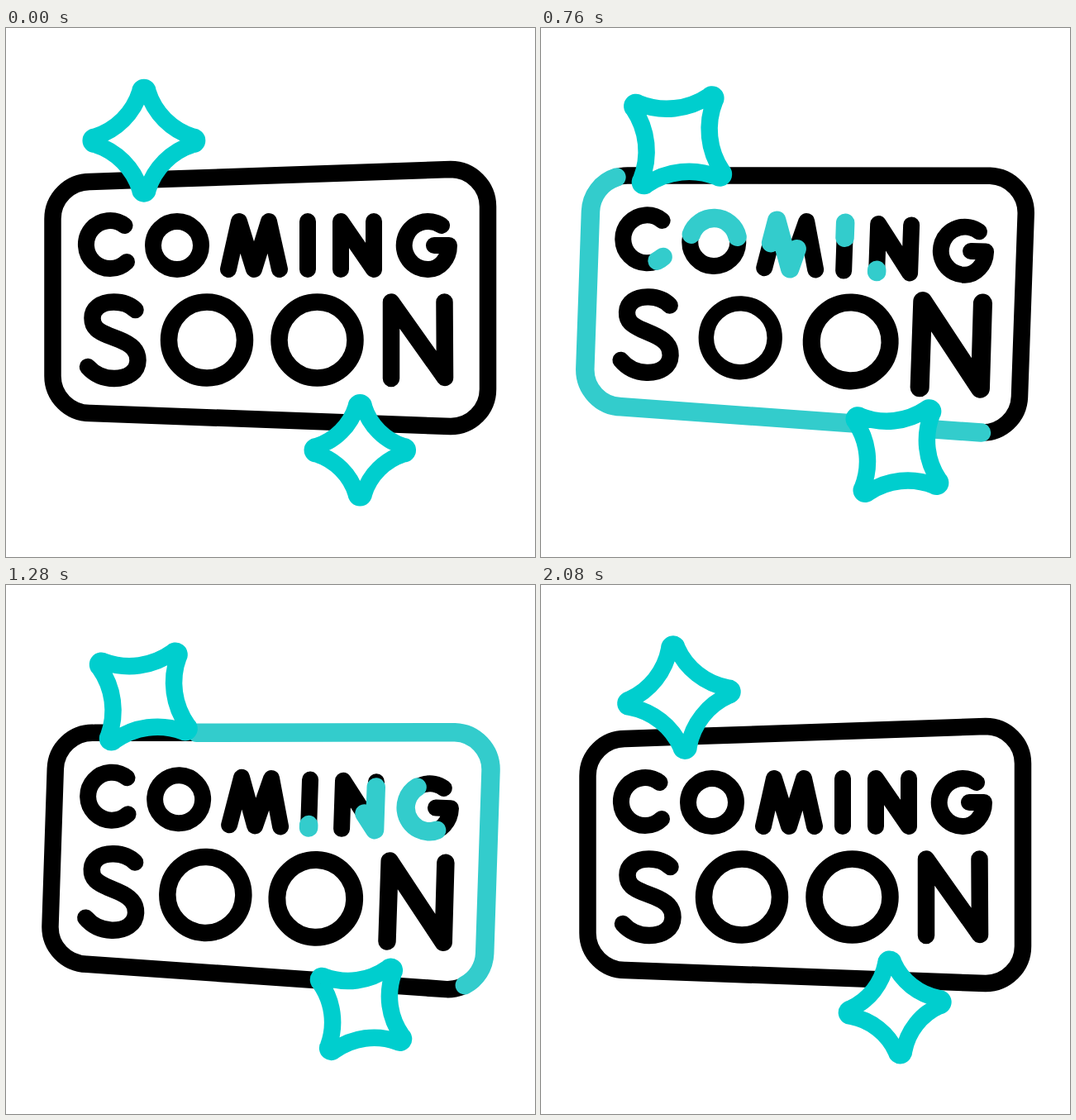
Recreate the animation shown at these times as an HTML page. Size 640 by 640 pixels, loop 2.12 s.

```html
<!DOCTYPE html>
<html lang="en">
<head>
<meta charset="utf-8">
<title>Coming soon</title>
<style>
  html, body { margin: 0; width: 100%; height: 100%; overflow: hidden; background: #fff; }
  svg { display: block; width: 100vw; height: 100vh; }
  path { fill: none; stroke: #000; stroke-width: 20.5; stroke-linecap: round; stroke-linejoin: round; }
  .small { stroke-width: 20; }
  .glow { stroke: #33cccc; stroke-width: 22.5; }
  .star { fill: #fff; stroke: #00cece; }
</style>
</head>
<body>
<svg id="stage" viewBox="0 0 640 640" role="img" aria-label="Coming soon">
  <g id="sign"></g>
</svg>
<script>
const LOOP = 2120, STEP = 40;
const stage = document.getElementById('stage');
const sign = document.getElementById('sign');

const clamp = x => Math.min(1, Math.max(0, x));
const smooth = x => { const u = clamp(x); return u * u * (3 - 2 * u); };
const triangle = x => 1 - Math.abs(1 - 2 * (x % 1));
const ring = (x, y, r) =>
  `M${x + r} ${y}A${r} ${r} 0 1 1 ${x - r} ${y}A${r} ${r} 0 1 1 ${x + r} ${y}`;

function addPath(parent, d, name) {
  const p = document.createElementNS('http://www.w3.org/2000/svg', 'path');
  p.setAttribute('d', d);
  if (name) p.setAttribute('class', name);
  parent.appendChild(p);
  return p;
}

// A teal stretch that runs along a black line: its head leads, its tail follows.
const glows = [];
function addGlow(d, start, lag, span) {
  const el = addPath(sign, d, 'glow');
  el.setAttribute('pathLength', 1);
  glows.push({ el, start, lag, span });
}

const frame = 'M194 182.8L102 186A45 45 0 0 0 56.5 231V421A45 45 0 0 0 102 466' +
  'L538 482A45 45 0 0 0 583 437V216A45 45 0 0 0 538 171Z';
addPath(sign, frame);
addGlow(frame, 35, 507, 1360);

const topRow = [
  ['M143.5 239A29 29 0 1 0 146 283', 10],
  [ring(207, 263, 29), 207],
  ['M269 292L282 234L300 292L318 234L331 292', 400],
  ['M365 234V292', 525],
  ['M405 292V234L445 292V234', 720],
  ['M527 239A29 29 0 1 0 511 292A25 29 0 0 0 536 263H518', 880]
];
for (const [d, start] of topRow) {
  addPath(sign, d, 'small');
  addGlow(d, start, 218, 630);
}

const bottomRow = [
  ['M156.5 341C150 334.5 141 331.5 130.5 331.5C114 331.5 104.5 340 104.5 351' +
   'C104.5 363 112 367 124 372L137 377C152 383 159.5 390 159.5 402' +
   'C159.5 416 147 424 131 424C117 424 107 419 99 410', 130],
  [ring(243, 377.5, 46), 243],
  [ring(376.5, 377.5, 46), 376.5],
  ['M466 424V331.5L531 423L530.5 331.5', 498.5]
].map(([d, x], i) => ({ el: addPath(sign, d), x, start: 125 + i * 133 }));

const bounce = [[0, 1], [260, 1.13], [500, 0.9], [740, 1.05], [1000, 1]];
function bounceAt(t) {
  if (t <= 0) return 1;
  for (let i = 1; i < bounce.length; i++) {
    const [t0, a] = bounce[i - 1], [t1, b] = bounce[i];
    if (t < t1) return a + (b - a) * smooth((t - t0) / (t1 - t0));
  }
  return 1;
}

// Each star sits a little off the point it turns around.
const stars = [
  { x: 166.4, y: 135.7, off: 0.5, r: 59.7, grow: 0.17 },
  { x: 429.3, y: 511.8, off: -1, r: 53, grow: 0.28 }
].map(s => ({ ...s, el: addPath(stage, '', 'star') }));

// Four rounded tips joined by hollow arcs; the line weight stays the same at any size.
function starPath(r) {
  const w = 4.5, bow = 1.4 * r;
  const tip = `A${w} ${w} 0 0 1 `, side = `A${bow} ${bow} 0 0 0 `;
  return `M${-w} ${-r}${tip}${w} ${-r}${side}${r} ${-w}${tip}${r} ${w}` +
    `${side}${w} ${r}${tip}${-w} ${r}${side}${-r} ${w}${tip}${-r} ${-w}${side}${-w} ${-r}Z`;
}

function draw(t) {
  const tilt = t < 1520 ? 2 * triangle(t * 3 / 1520) : 0;
  sign.setAttribute('transform', `rotate(${tilt} 320 326)`);

  for (const g of glows) {
    const head = smooth((t - g.start) / g.span);
    const tail = smooth((t - g.start - g.lag) / g.span);
    g.el.style.display = head > 0 && tail < 1 ? '' : 'none';
    g.el.setAttribute('stroke-dasharray', `${head - tail} 2`);
    g.el.setAttribute('stroke-dashoffset', -tail);
  }

  for (const b of bottomRow) {
    const k = bounceAt(t - b.start);
    b.el.setAttribute('transform',
      `translate(${b.x} 377.5) scale(${k}) translate(${-b.x} -377.5)`);
  }

  for (const s of stars) {
    const k = 1 + s.grow * triangle(2 * t / LOOP);
    s.el.setAttribute('d', starPath(s.r * k));
    s.el.setAttribute('transform', `translate(${s.x} ${s.y}) ` +
      `rotate(${360 * t / LOOP}) translate(${s.off * k} ${s.off * k})`);
  }
}

function tick() {
  draw(Math.floor(performance.now() % LOOP / STEP) * STEP);
  requestAnimationFrame(tick);
}
tick();
</script>
</body>
</html>
```
